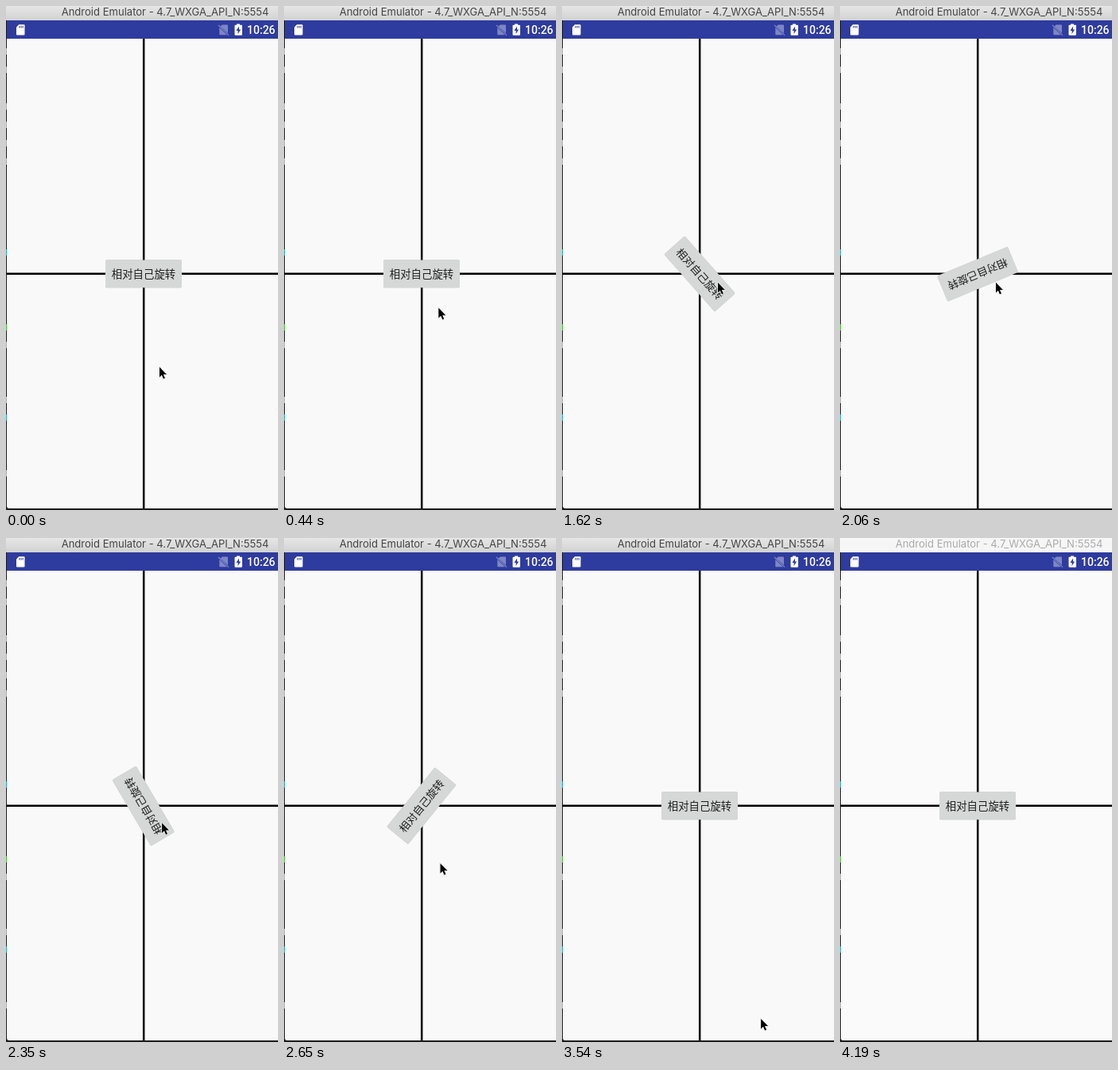
An HTML page for the animation above (4210 ms loop, 342 px wide and 632 px high).

```html
<!DOCTYPE html>
<html lang="zh-CN">
<head>
<meta charset="utf-8">
<title>Rotate</title>
<style>
  html, body { margin: 0; width: 100%; height: 100%; overflow: hidden; background: #f9f9f9; }
  svg { display: block; }
  .title { font: 400 13.05px Inter, "Open Sans", sans-serif; fill: #444; text-anchor: middle; }
  .clock { font: 500 14px Roboto, sans-serif; fill: #fff; }
  .label { font: 500 13.4px "Noto Sans CJK SC", "Noto Sans CJK", sans-serif; fill: #1f1f1f; text-anchor: middle; }
  .shadow { filter: drop-shadow(0 .5px .7px rgba(0, 0, 0, .28)); }
  .pressed .shadow { filter: drop-shadow(0 2px 2.2px rgba(0, 0, 0, .45)); }
  .behind { stroke: #aaa; stroke-dasharray: 8 15; }
  #pointer { filter: drop-shadow(0 .8px .6px rgba(0, 0, 0, .3)); }
  .inactive .title { fill: #ababab; }
  .inactive .bar { fill: #f6f6f6; }
  .inactive .page { fill: #fafafa; }
</style>
</head>
<body>
<svg id="stage" width="342" height="632" viewBox="0 0 342 632">
  <defs>
    <linearGradient id="chrome" x2="0" y2="1">
      <stop offset="0" stop-color="#e6e6e6"/>
      <stop offset="1" stop-color="#d2d2d2"/>
    </linearGradient>
  </defs>

  <!-- window behind, visible along the left edge -->
  <rect width="342" height="632" fill="#1d1d1f"/>
  <path class="behind" d="M.5 53V84M.5 122V200M.5 421V430M.5 490V499M.5 582V591"/>
  <path d="M.5 305V313M.5 512V520" stroke="#2aa"/>
  <path d="M.5 399V407" stroke="#4b3"/>

  <path class="page" d="M1 41H342V630H4Q1 630 1 627Z" fill="#f9f9f9"/>
  <rect class="bar" width="342" height="18" fill="url(#chrome)"/>
  <text class="title" x="200" y="12">Android Emulator - 4.7_WXGA_API_N:5554</text>

  <!-- status bar -->
  <rect x="1" y="18" width="341" height="23" fill="#2e3b9f"/>
  <path d="M16.2 23.3H22.5q1 0 1 1V35.5q0 1-1 1H14q-1 0-1-1V26.5Z" fill="#fff"/>
  <path d="M17 25v2.6M19.1 25v2.6M21.2 25v2.6" stroke="#2e3b9f"/>
  <g opacity=".38">
    <path d="M272 23.5h6q1 0 1 1V34L269.5 25.5ZM268.3 27L278 36.2H269.3q-1 0-1-1Z" fill="#fff"/>
    <path d="M267 24L280 36.6" stroke="#fff" stroke-width="1.2"/>
  </g>
  <path d="M290 22.4h4v1.4h2q1 0 1 1V35.7q0 1-1 1H288.5q-1 0-1-1V24.8q0-1 1-1H290Z" fill="#fff"/>
  <path d="M293 25.5L289.4 31H291.6V35L295.1 29.5H293Z" fill="#2e3b9f"/>
  <text class="clock" x="303" y="35">10:26</text>

  <path d="M173.2 41V630M1 335.7H342" stroke="#000" stroke-width="2.5"/>
  <g class="shadow"><rect class="spin" x="125" y="318.4" width="96" height="34.8" rx="1.8" fill="#d6d7d7"/></g>
  <text class="label spin" x="173" y="341">相对自己旋转</text>
  <path id="pointer" d="M1 1.8V14.4L3.9 11.7 5.9 16.4 7.9 15.5 5.9 10.9H9.9Z"
    fill="#000" stroke="#fff" stroke-width="1.6" stroke-linejoin="round" paint-order="stroke"/>
</svg>
<script>
  const LOOP = 4210, STEP = 147.3, LEAD = 8;
  const stage = document.getElementById("stage");
  const pointer = document.getElementById("pointer");
  const spinners = document.querySelectorAll(".spin");

  const progress = (t, start, end) => Math.min(1, Math.max(0, (t - start) / (end - start)));
  const smooth = k => (1 - Math.cos(Math.PI * k)) / 2;

  // Up to the button, a small nudge on click, down again, then out at the corner
  function pointerAt(t) {
    const up = smooth(progress(t, 0, 730));
    const nudge = progress(t, 1030, 1320);
    const down = progress(t, 2210, 3240) ** 1.6;
    const out = progress(t, 3390, 3830);
    return [192 + 2 * up + nudge + 2 * down + 158 * out, 451 - 112 * up + 6 * nudge + 237 * down + 58 * out];
  }

  function draw() {
    const now = performance.now() % LOOP;
    const t = Math.floor((now + LEAD) / STEP) * STEP;
    const turn = `rotate(${360 * smooth(progress(t, 1142, 3142))} 173 336)`;
    spinners.forEach(el => el.setAttribute("transform", turn));
    pointer.setAttribute("transform", `translate(${pointerAt(t)})`);
    stage.classList.toggle("pressed", t > 1030 && t < 1320);
    stage.classList.toggle("inactive", now >= 4190);
    requestAnimationFrame(draw);
  }
  draw();
</script>
</body>
</html>
```
